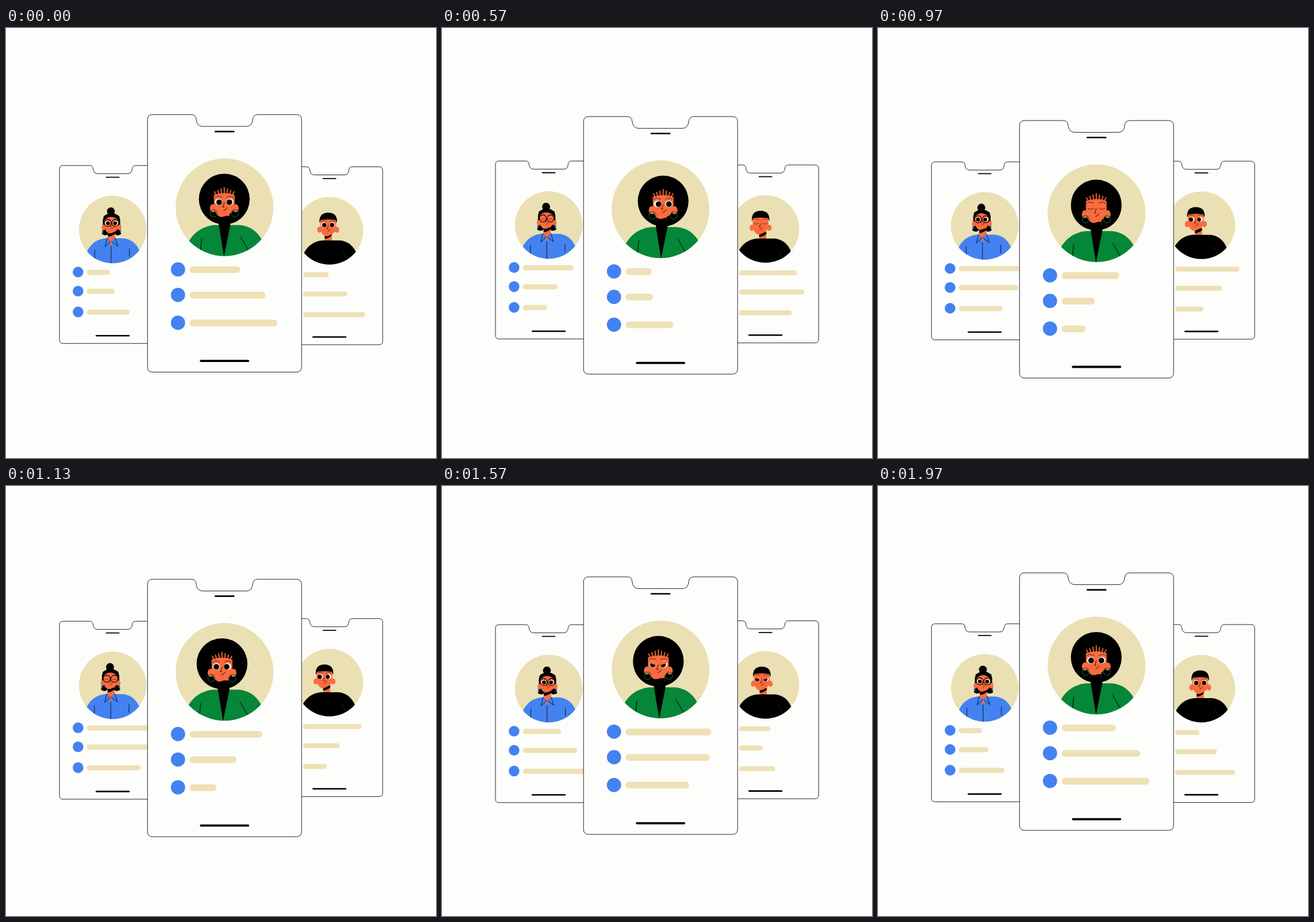
An HTML page with a canvas for the animation above (2.01 s loop, 748 by 748 pixels).

```html
<!DOCTYPE html>
<html lang="en">
<head>
<meta charset="utf-8">
<title>Profile cards</title>
<style>
  html, body { margin: 0; width: 100%; height: 100%; overflow: hidden; background: #fdfdfb; }
  canvas { display: block; }
</style>
</head>
<body>
<canvas id="stage" width="748" height="748"></canvas>
<script>
const ctx = document.getElementById('stage').getContext('2d');
const LOOP = 2010;
const SAND = '#eae0b3', BAR = '#eee1b5', BLUE = '#4382f0', GREEN = '#058638',
      SKIN = '#fb6b3d', INK = '#000', PAPER = '#fdfdfc';

const outline = new Path2D('M9 0H76Q84 0 84.500 8Q86 20.500 96 20.500H172Q182 20.500 183 8Q184 0 192 0' +
  'H259Q268 0 268 9V439Q268 448 259 448H9Q0 448 0 439V9Q0 0 9 0Z');
const faceShape = new Path2D('M-18-12Q0-19 18-12L18 8Q17 17 9 21Q0 27-7 26Q-17 21-18 8Z');

// Cosine wave that is lowest at time `low`
const wave = (t, mid, amp, low) => mid - amp * Math.cos((t - low) / LOOP * 2 * Math.PI);

// Smooth steps through [time, value] pairs
function follow(keys, t) {
  let [t0, v0] = keys[0];
  for (const [t1, v1] of keys) {
    if (t < t1) {
      const p = (t - t0) / (t1 - t0);
      return t <= t0 ? v0 : v0 + (v1 - v0) * p * p * (3 - 2 * p);
    }
    [t0, v0] = [t1, v1];
  }
  return v0;
}

const lidAt = (blinks, t) =>
  Math.max(0, ...blinks.map(b => Math.min(1, 1.1 - Math.abs(t - b) / 120)));

function fill(shape, color) {
  ctx.fillStyle = color;
  ctx.fill(typeof shape === 'string' ? new Path2D(shape) : shape);
}

function stroke(shape, color, width) {
  ctx.strokeStyle = color;
  ctx.lineWidth = width;
  ctx.stroke(typeof shape === 'string' ? new Path2D(shape) : shape);
}

function oval(x, y, rx, ry = rx) {
  const p = new Path2D();
  p.ellipse(x, y, rx, ry, 0, 0, 7);
  return p;
}

function shoulders(y, color) {
  fill(`M-82 95L-62 ${y + 28}Q-47 ${y + 3}-18 ${y}H26Q52 ${y + 2} 65 ${y + 26}L84 95Z`, color);
}

function eye(x, side, gaze, lid) {
  if (lid > 0.9) {
    stroke(`M${x - 5} 1Q${x} 4 ${x + 5} 1`, INK, 0.7);
    return;
  }
  const ball = oval(x, 0, 6.3, 6);
  ctx.save();
  ctx.clip(ball);
  fill(ball, '#fff');
  fill(oval(x - side * 0.8 + gaze, 0.5, 4.9), INK);
  if (lid > 0) {
    const y = -7 + lid * 13;
    fill(`M${x - 8}-9H${x + 8}V${y - side * 2.5}L${x - 8} ${y + side * 2.5}Z`, SKIN);
  }
  ctx.restore();
}

function face(gaze, lid) {
  for (const side of [-1, 1]) fill(oval(side * 20, 11, 5, 7), SKIN);
  fill(faceShape, SKIN);
  for (const side of [-1, 1]) {
    eye(side * 9.8, side, gaze, lid);
    stroke(`M${side * 4}-8Q${side * 10}-12 ${side * 16}-8`, INK, 0.7);
  }
  stroke('M0 1Q-1 6-3 9H0M-1 15Q3 14 5 10', INK, 0.9);
}

const afro = {
  eyes: [-0.5, -9.3],
  faceSize: 1,
  neckY: 31,
  body() {
    shoulders(31, GREEN);
    fill('M-10 20H10V31L-1 86L-10 31Z', INK);
    stroke('M-40 55L-42 77M28 52L41 74', INK, 1);
  },
  back() { fill(oval(0, -4.9, 44.2), INK); },
  front() {
    for (let i = -3; i <= 3; i++)
      stroke(`M${i * 4.6}-12L${i * 5.7}${-25 + Math.abs(i) * 2.4}`, SKIN, 1.8);
    for (const side of [-1, 1]) stroke(oval(side * 18.5, 20, 6, 6.5), '#0a5c34', 1.1);
  }
};

const bun = {
  eyes: [-3, -16.5],
  faceSize: 1,
  neckY: 22,
  body() {
    shoulders(22, BLUE);
    fill('M-13 18H5L-4 42Z', SKIN);
    fill('M-14 21L-19 43L-5 29ZM6 21L13 42L-3 29Z', BLUE);
    stroke('M-14 21L-19 43L-5 30M6 21L13 42L-3 30M-4 42V86M-45 51V74M42 48V68', INK, 1.2);
  },
  back() {
    fill(oval(-1.5, -29.5, 10), INK);
    fill(oval(0, -5, 22, 20), INK);
    fill('M-22 0L-24 28Q-15 34-8 28V0ZM22 0L24 28Q15 34 8 28V0Z', INK);
  },
  front() {
    fill('M-20-3Q-15-13-2-17Q13-14 20-3V-17Q0-31-20-17Z', INK);
    for (const side of [-1, 1]) {
      stroke(oval(side * 9.6, 0, 8.8), INK, 1.5);
      stroke(`M${side * 22} 16V24`, BLUE, 2);
    }
  }
};

const crop = {
  eyes: [-3, -15],
  faceSize: 1.1,
  neckY: 24,
  body() {
    shoulders(24, INK);
    stroke('M34 52L46 74', '#26262c', 1.2);
  },
  back() {},
  front() {
    fill('M-20-4Q-22-28 0-28Q22-28 20-4L17-11Q0-14-17-11Z', INK);
  }
};

const cards = [
  {
    x: 93, size: 0.691, y: [236.3, 5.3, 690], who: bun,
    rows: [185.3, 218.5, 254.6], dot: [32.4, 9.3], bar: [47.5, 9],
    ends: [125, 37], lows: [-30, 220, 480],
    turn: [[400, 0], [740, -4], [980, -4], [1320, 0]], blinks: [570, 1150]
  },
  {
    x: 470, size: 0.691, y: [236.4, -5.8, 170], who: crop,
    rows: [187.3, 220.7, 256.8], dot: [32, 9.3], bar: [46.7, 8.6],
    ends: [124.3, 37], lows: [-150, 1510, 1200],
    turn: [[380, 0], [640, -11], [1000, -11], [1300, -7], [1500, -7], [1800, 0]], blinks: [570, 1640]
  },
  {
    x: 246.2, size: 1, y: [156, 6.2, 170], who: afro,
    rows: [269.3, 313.7, 362], dot: [53, 12.4], bar: [73.2, 11.8],
    ends: [170.3, 55.5], lows: [450, 720, 990],
    turn: [[170, 0], [430, 5], [700, 5], [1240, -5], [1400, -5], [1850, 0]], blinks: [300, 970, 1640]
  }
];

function portrait({ who, turn, blinks }, t) {
  const dx = follow(turn, t);
  const [ex, ey] = who.eyes;
  const at = (x, y, scale, draw) => {
    ctx.save();
    ctx.translate(x, y);
    ctx.scale(scale, scale);
    draw();
    ctx.restore();
  };
  const head = draw => at(ex + dx, ey, who.faceSize, draw);

  ctx.save();
  ctx.translate(134, 161.2);
  const frame = oval(0, 0, 85);
  fill(frame, SAND);
  ctx.clip(frame);
  head(who.back);
  at(dx * 0.4, 0, 1, () => {
    const y = who.neckY;
    fill(`M${ex - 9} ${y - 20}h18V${y + 2}h-18Z`, SKIN);
    fill(`M${ex - 9} ${y - 16}h18v4Q${ex + 2} ${y - 5} ${ex - 9} ${y - 4}Z`, INK);
    who.body();
  });
  head(() => {
    face(dx * 0.2, lidAt(blinks, t));
    who.front();
  });
  ctx.restore();
}

function drawCard(card, t) {
  const { x, size, rows, dot, bar, ends, lows } = card;
  ctx.save();
  ctx.translate(x, wave(t, ...card.y));

  ctx.save();
  ctx.scale(size, size);
  fill(outline, PAPER);
  stroke(outline, '#222230', 1 / size);
  ctx.lineCap = 'round';
  stroke('M118 29.500H150', INK, 2.6);
  stroke('M93 428.500H175', INK, 3.8);
  portrait(card, t);
  ctx.restore();

  rows.forEach((y, i) => {
    fill(oval(dot[0], y, dot[1]), BLUE);
    const [left, height] = bar;
    const pill = new Path2D();
    pill.roundRect(left, y + 0.4 - height / 2, wave(t, ...ends, lows[i]) - left, height, height / 2);
    fill(pill, BAR);
  });
  ctx.restore();
}

function render(now) {
  const t = now % LOOP;
  ctx.fillStyle = '#fdfdfb';
  ctx.fillRect(0, 0, 748, 748);
  for (const card of cards) drawCard(card, t);
  requestAnimationFrame(render);
}
render(performance.now());
</script>
</body>
</html>
```
